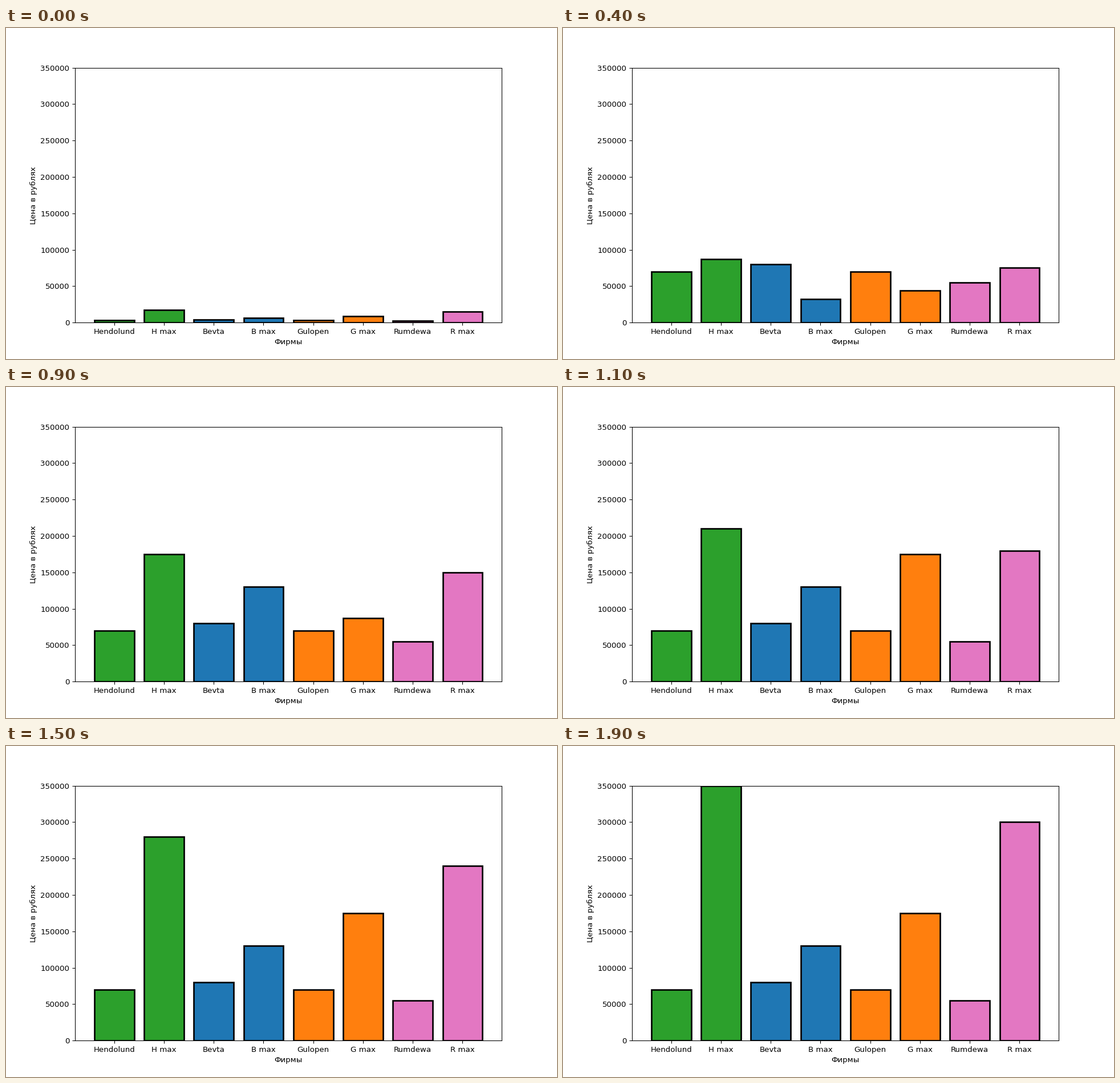
Write a matplotlib script that moves like this. It is 966 px wide and 580 px high and loops after 2000 ms.

```python
import matplotlib.pyplot as plt
from matplotlib.animation import FuncAnimation

FRAMES = 20
INTERVAL = 100
TOP = 350000
DPI = 96.6

BARS = [
    ("Hendolund", 70000, "tab:green"),
    ("H max", 350000, "tab:green"),
    ("Bevta", 80000, "tab:blue"),
    ("B max", 130000, "tab:blue"),
    ("Gulopen", 70000, "tab:orange"),
    ("G max", 175000, "tab:orange"),
    ("Rumdewa", 55000, "tab:pink"),
    ("R max", 300000, "tab:pink"),
]
names, prices, colors = zip(*BARS)

plt.rcParams["font.family"] = "DejaVu Sans"
# 966 x 580 pixels; the height is rounded up so it never truncates to 579
fig, ax = plt.subplots(figsize=(10, 6.00415), dpi=DPI)
bars = ax.bar(names, prices, color=colors, edgecolor="black", linewidth=2)
ax.set_ylim(0, TOP)
ax.set_xlabel("Фирмы")
ax.set_ylabel("Цена в рублях")


def height(price, step):
    """Grow in proportion, then jump to full once the tallest bar passes it."""
    level = TOP * step / FRAMES
    return price if level > price else price * step / FRAMES


def update(frame):
    for bar, price in zip(bars, prices):
        bar.set_height(height(price, frame + 1))
    return list(bars)


def init():
    return update(0)


anim = FuncAnimation(fig, update, frames=FRAMES, init_func=init,
                     interval=INTERVAL, repeat=True, repeat_delay=0)
plt.show()
```
